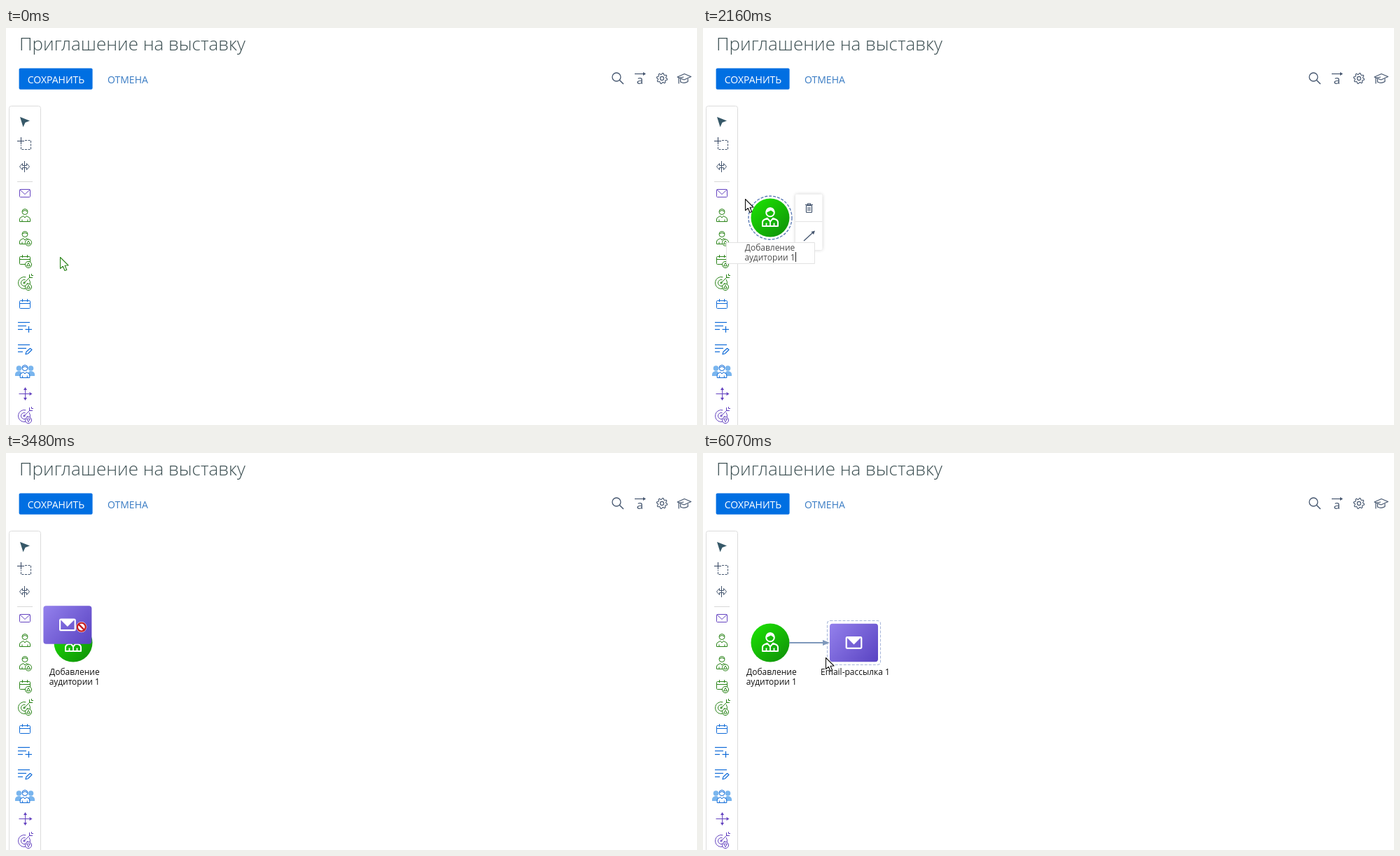
An HTML page with a canvas that plays this animation: 987x567 px, repeating every 6450 ms.

```html
<!DOCTYPE html>
<html lang="ru">
<head>
<meta charset="utf-8">
<style>
html, body { margin: 0; width: 100%; height: 100%; overflow: hidden; background: #fff; }
canvas { display: block; width: 987px; height: 567px; }
</style>
</head>
<body>
<canvas id="stage" width="987" height="567"></canvas>
<script>
const ctx = document.getElementById('stage').getContext('2d');
const LOOP = 6450;
const SLATE = '#45566f', GREEN = '#2a8418', BLUE = '#0f6bd8', PURPLE = '#6443c0';
const NODE = { x: 96, y: 271 }, MAIL = { x: 215.5, y: 271 };

// start, end, number of steps, destination of the pointer
const MOVES = [
  [60, 680, 9, 24, 271], [840, 840, 1, 29, 274],
  [1160, 1160, 1, 61, 268], [1230, 1740, 8, 96, 271],
  [1900, 2160, 4, 60, 244], [2220, 2540, 5, 33, 237],
  [2600, 2600, 1, 32, 243], [2990, 2990, 1, 58, 240],
  [3150, 3310, 3, 81, 243], [3410, 3740, 5, 215, 271],
  [3840, 3900, 2, 215, 277], [4600, 4860, 4, 158, 278],
  [4930, 5190, 4, 104, 274], [5330, 5430, 2, 125, 275],
  [5620, 5620, 1, 152, 297], [5910, 6070, 3, 175, 292]
];

function pointerAt(t) {
  let x = 77, y = 327;
  for (const [a, b, n, tx, ty] of MOVES) {
    if (t < a) break;
    const k = b > a ? Math.min(n, Math.floor((t - a) / (b - a) * (n - 1) + 1e-6) + 1) : n;
    const u = k / n, p = n > 8 ? u * u * (3 - 2 * u) : u;
    x += (tx - x) * p;
    y += (ty - y) * p;
  }
  return { x, y };
}

const within = (t, a, b) => t >= a && t < b;

function paint(stroke, fill, width = 1) {
  if (fill) { ctx.fillStyle = fill; ctx.fill(); }
  if (stroke) { ctx.strokeStyle = stroke; ctx.lineWidth = width; ctx.stroke(); }
}
function poly(pts, stroke, fill, width, closed = true) {
  ctx.beginPath();
  for (let i = 0; i < pts.length; i += 2) ctx.lineTo(pts[i], pts[i + 1]);
  if (closed) ctx.closePath();
  paint(stroke, fill, width);
}
const line = (pts, color, width = 1) => poly(pts, color, null, width, false);
function circle(x, y, r, stroke, fill, width) {
  ctx.beginPath();
  ctx.arc(x, y, r, 0, Math.PI * 2);
  paint(stroke, fill, width);
}
function box(x, y, w, h, r, stroke, fill, width) {
  ctx.beginPath();
  ctx.roundRect(x, y, w, h, r);
  paint(stroke, fill, width);
}
function shape(d, stroke, fill, width = 1) {
  const p = new Path2D(d);
  if (fill) { ctx.fillStyle = fill; ctx.fill(p); }
  if (stroke) { ctx.strokeStyle = stroke; ctx.lineWidth = width; ctx.stroke(p); }
}
function at(x, y, draw) {
  ctx.save();
  ctx.translate(x, y);
  draw();
  ctx.restore();
}
function text(s, x, y, size, color, align = 'left', weight = 400) {
  ctx.font = `${weight} ${size}px "Open Sans", "Noto Sans", sans-serif`;
  ctx.textAlign = align;
  ctx.fillStyle = color;
  ctx.fillText(s, x, y);
}
function shade(w, h, from, to) {
  const g = ctx.createLinearGradient(-w, -h, w, h);
  g.addColorStop(0, from);
  g.addColorStop(1, to);
  return g;
}

// toolbar icons, drawn around 0,0
function person(c, fill, w = 7.5) {
  shape(`M${-w} 9.5V6Q${-w} 3.5 -4 2.5L-2 1.5L0 4L2 1.5L4 2.5Q${w} 3.5 ${w} 6V9.5Z`, c, fill);
  circle(0, -4.5, 4, c, fill);
  line([-4, -5, 0, -6.5, 4, -5], c);
  line([3.5 - w, 6.5, 3.5 - w, 9.5], c);
  line([w - 3.5, 6.5, w - 3.5, 9.5], c);
}
function badge(x, y, c, down) {
  circle(x, y, 4.6, c, '#fff');
  const s = down ? -1 : 1;
  poly([x, y - 2.5 * s, x + 2.6, y + 1.8 * s, x - 2.6, y + 1.8 * s], c, null, 1);
}
function calendar(c) {
  box(-7.5, -4.5, 15, 11, 1, c);
  line([-7.5, -0.5, 7.5, -0.5], c);
  line([-3.5, -7, -3.5, -3], c);
  line([3.5, -7, 3.5, -3], c);
}
function target(c, down) {
  ctx.beginPath();
  ctx.arc(-1, 1, 8.5, -0.6, 5, false);
  paint(c);
  ctx.beginPath();
  ctx.arc(-1, 1, 4.5, 0, 5.1);
  paint(c);
  circle(-1, 1, 1.2, c);
  line([-1, 1, 7.5, -7.5], c);
  line([6.5, -11, 6.5, -6.5, 11, -6.5], c);
  line([9.5, -12, 9.5, -9.5, 12, -9.5], c);
  badge(5, 7, c, down);
}
function listLines(c) {
  line([-10, -6.5, 7, -6.5], c, 1.2);
  line([-10, -1.5, 2, -1.5], c, 1.2);
  line([-10, 3.5, -3, 3.5], c, 1.2);
}
function head(x, y, dx, dy, c) {
  poly([x + dx * 4, y + dy * 4, x - dy * 2.5, y + dx * 2.5, x + dy * 2.5, y - dx * 2.5], null, c);
}

function toolbar() {
  box(4.5, 111.5, 45, 480, 3, '#dcdcdc', '#fff');
  poly([20, 127, 34, 132.5, 27.5, 135, 24.5, 141.5], null, '#365868');
  line([16, 161.5, 26, 161.5], SLATE, 1.2);
  line([21.5, 156, 21.5, 166], SLATE, 1.2);
  ctx.setLineDash([3, 1.5]);
  line([27, 160.5, 35.5, 160.5, 35.5, 173.5, 21.5, 173.5, 21.5, 167], SLATE);
  ctx.setLineDash([]);
  poly([19.5, 198, 23.5, 193.5, 23.5, 196.5, 29.5, 196.5, 29.5, 193.5, 33.5, 198,
    29.5, 202.5, 29.5, 199.5, 23.5, 199.5, 23.5, 202.5], SLATE);
  line([26.5, 190, 26.5, 206], SLATE);
  line([16, 219.5, 38, 219.5], '#d8d8d8');

  at(27, 236, () => {
    box(-7.5, -5.5, 15, 11, 1, PURPLE);
    line([-7, -5, 0, 1.5, 7, -5], PURPLE);
  });
  at(27, 267, () => person(GREEN));
  at(27, 299, () => { person(GREEN); badge(5, 7.5, GREEN); });
  at(27, 331, () => { calendar(GREEN); badge(5, 7, GREEN); });
  at(27, 363, () => target(GREEN));
  at(27, 394, () => calendar(BLUE));
  at(27, 427, () => {
    listLines(BLUE);
    line([0.5, 3.5, 10, 3.5], BLUE, 1.2);
    line([5.5, -1, 5.5, 8], BLUE, 1.2);
  });
  at(27, 459, () => {
    listLines(BLUE);
    poly([1, 7, 2, 3.5, 7.5, -1.5, 10, 0.5, 4.5, 6], BLUE, '#fff', 1.1);
  });
  at(27, 490, () => {
    for (const s of [-1, 1]) {
      circle(s * 8.5, -4, 3.8, null, '#79b5ee');
      shape(`M${s * 14} 7V4Q${s * 13} 0 ${s * 8} 0Q${s * 4} 0 ${s * 4} 7Z`, null, '#79b5ee');
    }
    person(BLUE, '#fff', 6.8);
  });
  at(27.5, 522.5, () => {
    line([-9, 0, 6, 0], PURPLE);
    line([0, -6, 0, 6], PURPLE);
    head(6, 0, 1, 0, PURPLE);
    head(0, -5.5, 0, -1, PURPLE);
    head(0, 5.5, 0, 1, PURPLE);
  });
  at(27, 553, () => target(PURPLE, true));
}

function header() {
  text('Приглашение на выставку', 19, 32, 26, '#3c4f52', 'left', 300);
  box(18.6, 57.6, 105, 30.2, 2, null, '#006fe2');
  text('СОХРАНИТЬ', 71.5, 78.5, 14, '#fff', 'center');
  text('ОТМЕНА', 145, 78.5, 14, '#3a7cc4');

  circle(872, 70, 6, SLATE, null, 1.3);
  line([876.5, 74.5, 882, 80], SLATE, 1.5);
  text('a', 905.5, 80, 17, SLATE, 'center');
  line([898, 65.5, 912, 65.5], SLATE, 1.2);
  head(910, 65.5, 1, 0, SLATE);
  const gear = [];
  for (let i = 0; i < 32; i++) {
    const a = (i + 0.5) * Math.PI / 16, r = i % 4 < 2 ? 7.6 : 5.8;
    gear.push(937 + r * Math.cos(a), 72 + r * Math.sin(a));
  }
  poly(gear, SLATE, null, 1.1);
  circle(937, 72, 2.6, SLATE, null, 1.1);
  poly([959, 70, 969, 65.5, 978.5, 69.5, 968.5, 74], SLATE, null, 1.2);
  shape('M963.5 72.5V77Q968.5 80 974 76.5V72.5', SLATE, null, 1.2);
  line([968, 70, 961, 71.5, 961, 79.5], SLATE, 1.2);
}

function audience(x, y) {
  at(x, y, () => {
    circle(0, 0, 27.5, null, shade(18, 20, '#1bd903', '#119a08'));
    shape('M-11 12V6.5Q-11 3.5 -7 2L-4 0.8L0 5.5L4 0.8L7 2Q11 3.5 11 6.5V12Z', '#fff', null, 2);
    circle(0, -7.5, 5.8, '#fff', null, 2);
    shape('M-6 -7Q-7 -14.5 0 -15Q7 -14.5 6 -7L1 -10.5Z', null, '#fff');
    line([-5.5, 7.5, -5.5, 12], '#fff', 1.8);
    line([5.5, 7.5, 5.5, 12], '#fff', 1.8);
    line([0, 5, 0, 12], '#fff', 1.8);
  });
}
function mailing(x, y) {
  at(x, y, () => {
    box(-34.5, -27.2, 69, 54.5, 4, null, shade(31, 27, '#927feb', '#5b45c3'));
    box(-10.8, -7.8, 21.6, 15.6, 1.5, '#fff', null, 2.2);
    poly([-11, -8.5, 11, -8.5, 0, 2.5], null, '#fff');
  });
}
function ring(strong) {
  ctx.setLineDash([4, 2]);
  circle(NODE.x, NODE.y, 31, strong ? '#5474b4' : '#a8b8da', null, 1.3);
  ctx.setLineDash([]);
}
function frame(strong) {
  ctx.setLineDash([4, 2]);
  box(177.5, 239.5, 76, 63, 4, strong ? '#3f50ac' : '#a8b8da', null, strong ? 1.4 : 1.1);
  ctx.setLineDash([]);
}
function popup(x) {
  ctx.save();
  ctx.shadowColor = 'rgba(0,0,0,.2)';
  ctx.shadowBlur = 5;
  box(x, 237.5, 38.5, 79.5, 2, null, '#fff');
  ctx.restore();
  line([x, 276.5, x + 38.5, 276.5], '#e4e4e4');
  at(x + 19.5, 257, () => {
    box(-4, -3.5, 8, 10, 1, SLATE, null, 1.2);
    line([-5.5, -4.5, 5.5, -4.5], SLATE, 1.2);
    line([-2, -4.5, -2, -6.3, 2, -6.3, 2, -4.5], SLATE, 1.1);
    for (const i of [-1.7, 0, 1.7]) line([i, -1.5, i, 4.5], SLATE, 0.8);
    line([-7.5, 47, 5, 35.5], SLATE, 1.3);
    poly([8.5, 32.5, 6.5, 38, 3, 34], null, SLATE);
  });
}
function editor(x, w, h, rows, caretX, caretOn) {
  box(x + 0.5, 306.5, w, h, 0, '#e2e2e2', '#fff');
  const mid = rows.length > 1 ? 95.5 : 215.5;
  rows.forEach((s, i) => text(s, mid, 318 + i * 13.5, 12, '#4c4c4c', 'center'));
  const y = 308 + (rows.length - 1) * 12;
  if (caretOn) line([caretX, y, caretX, y + 14], '#222');
}
function label(rows, mid) {
  rows.forEach((s, i) => text(s, mid, 316.5 + i * 14, 12, '#111', 'center'));
}

function arrowCursor(x, y, ink) {
  at(x + 0.5, y + 0.5, () =>
    poly([0, 0, 0, 16, 3.8, 12.8, 6.5, 19, 9.3, 18, 6.6, 11.8, 11.5, 11.5], ink, '#fff', 1.1));
}
function handCursor(x, y) {
  at(x, y, () => {
    shape('M-3.5 6.5L-4 4L-6.5 0.5Q-7 -2 -4.5 -1.2L-4.6 -4Q-3.8 -6.3 -2 -5Q-1 -7 1 -5.6' +
      'Q3 -6.8 4 -4.6Q6.5 -5 6.5 -2V1.5L4.5 4.5V6.5Z', '#111', '#fff', 1.3);
    for (const i of [-1.6, 1.2, 4]) line([i, -4.5, i, -2.3], '#111', 0.8);
  });
}
function denyCursor(x, y) {
  circle(x, y, 6.6, '#fff', '#fff', 2);
  circle(x, y, 6, '#c41e22', null, 2.4);
  line([x - 4, y - 4, x + 4, y + 4], '#c41e22', 2.4);
}

function connector(x, y) {
  line([123, 271, x - 6, y], '#7e98bb', 2);
  poly([x, y, x - 10, y - 4, x - 10, y + 4], null, '#7e98bb');
}

function scene(t, p) {
  const dragMail = within(t, 3150, 4380);
  if (t >= 3575 && t < 4380) line([0, 271.5, 987, 271.5], '#fae6ba', 1.5);

  if (t >= 1740) audience(NODE.x, NODE.y);
  else if (t >= 1230) audience(p.x, p.y);
  if (t >= 2990) label(['Добавление', 'аудитории 1'], 97.8);
  if (within(t, 1740, 2990) || within(t, 5330, 6070)) ring(true);
  else if (within(t, 5105, 5330)) ring(false);

  if (dragMail) {
    const lag = Math.max(0, Math.min(1, (215 - p.x) / 134));
    const y = t >= 3575 ? MAIL.y : p.y - 4 * lag;
    mailing(p.x - 25.5 * lag + 0.5, y);
  } else if (t >= 4380) {
    mailing(MAIL.x, MAIL.y);
    if (t < 5330) frame(true);
    else {
      label(['Email-рассылка 1'], 217.5);
      if (t >= 6070) frame(false);
    }
  }
  if (t >= 6070) connector(181, 271);
  else if (t >= 5910) connector(p.x, p.y - 10);

  toolbar();
  if (within(t, 1740, 2990) || within(t, 5430, 5910)) popup(132);
  if (within(t, 4380, 5330)) popup(258.5);
  if (within(t, 1740, 2990))
    editor(33, 126, 30, ['Добавление', 'аудитории 1'], 132.5, (t - 1740) % 1000 < 500);
  if (within(t, 4380, 5330))
    editor(152, 127, 16, ['Email-рассылка 1'], 265.5, t < 4850);
}

function cursor(t, p) {
  if (within(t, 3150, 3575) && p.x < 130) denyCursor(p.x, p.y);
  else if (within(t, 910, 1740) || within(t, 2760, 4380)) handCursor(p.x, p.y);
  else arrowCursor(p.x, p.y, t < 840 ? GREEN : '#111');
}

function draw(t) {
  const p = pointerAt(t);
  ctx.fillStyle = '#fff';
  ctx.fillRect(0, 0, 987, 567);
  ctx.lineJoin = 'round';
  header();
  scene(t, p);
  cursor(t, p);
}

const begin = performance.now();
function tick() {
  draw((performance.now() - begin) % LOOP);
  requestAnimationFrame(tick);
}
tick();
</script>
</body>
</html>
```
